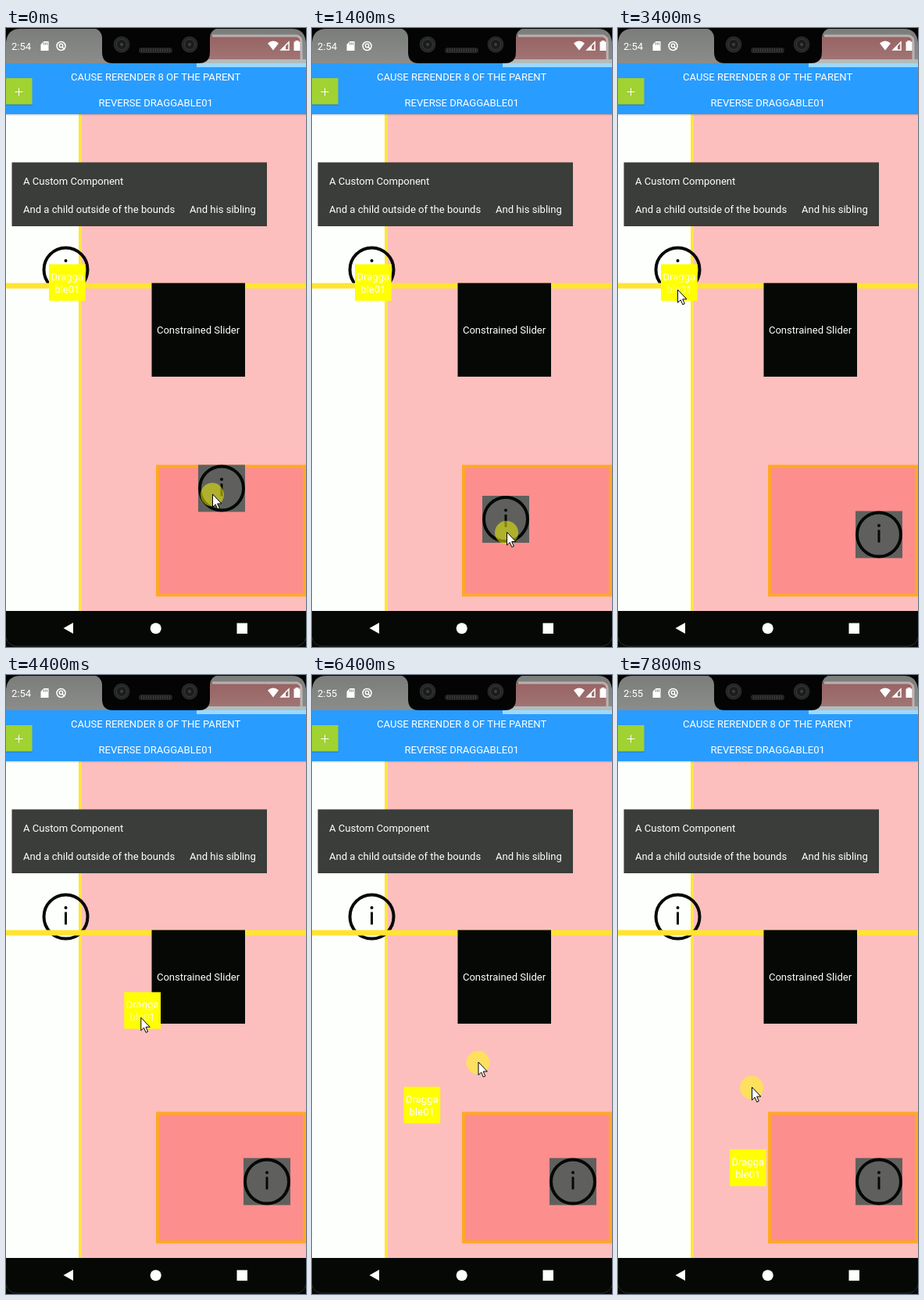
Recreate the animation shown at these times as an HTML page. Size 384x790 px, loop 8 s.

```html
<!DOCTYPE html>
<html lang="en">
<head>
<meta charset="utf-8">
<style>
  html, body { margin: 0; width: 100%; height: 100%; overflow: hidden; background: #050805; }
  svg { display: block; width: 100vw; height: 100vh; }
  text { font: 13.07px Roboto, sans-serif; fill: #fff; }
  .mid { text-anchor: middle; }
</style>
</head>
<body>
<svg viewBox="0 0 384 790">
  <defs>
    <linearGradient id="bar" x2="0" y2="1">
      <stop stop-color="#7b7d7b"/><stop offset="1" stop-color="#8b8d8b"/>
    </linearGradient>
    <linearGradient id="glare" x2="0" y2="1">
      <stop stop-color="#976262"/><stop offset="1" stop-color="#a27777"/>
    </linearGradient>
    <g id="info" fill="#050805">
      <circle cx="30" cy="30" r="28" fill="none" stroke="#050805" stroke-width="4"/>
      <circle cx="30" cy="18.5" r="2"/>
      <path d="M28.5 24h3v16h-3z"/>
    </g>
    <g id="camera">
      <circle r="10.5" fill="#262827"/>
      <circle r="6.5" fill="#1b1d1c" stroke="#393b3a"/>
      <circle r="2" fill="#3d403f"/>
    </g>
  </defs>

  <!-- page -->
  <path fill="#fdfffc" d="M0 110h96v634H0z"/>
  <path fill="#fdbebe" d="M96 110h288v634H96z"/>
  <path fill="#ffe63a" d="M93 110h4v634h-4z"/>
  <use href="#info" x="46.500" y="278.500"/>
  <path fill="#ffe432" d="M0 325.500h384v7H0z"/>
  <path fill="#050805" d="M186.500 325.500H306V445H186.500z"/>
  <text class="mid" x="246" y="390">Constrained Slider</text>
  <path fill="#fd8e8e" stroke="#ffa826" stroke-width="4" d="M194 559.500h188v164H194z"/>
  <path fill="#3a3d39" d="M7.500 171.500H334V253H7.500z"/>
  <text x="22" y="200">A Custom Component</text>
  <text x="22" y="236">And a child outside of the bounds</text>
  <text x="235" y="236">And his sibling</text>

  <!-- header -->
  <path fill="#000" opacity=".15" d="M0 110h384v1.500H0z"/>
  <path fill="#299cff" d="M0 45h384v65H0z"/>
  <path fill="#9cd9ff" d="M244 45h140v5H244z"/>
  <text class="mid" x="191.700" y="67">CAUSE RERENDER 8 OF THE PARENT</text>
  <text class="mid" x="191.700" y="99.500">REVERSE DRAGGABLE01</text>
  <path fill="#000" opacity=".15" d="M0 97h34v2H0z"/>
  <path fill="#a0d232" d="M0 64h33.500v33.500H0z"/>
  <path stroke="#fff" d="M11.500 81.500h10M16.500 76.500v10"/>

  <!-- status bar and notch -->
  <path fill="#030403" d="M0 0h384v45H0z"/>
  <path fill="url(#bar)" d="M0 45V18Q2 1 18 1H366Q382 1 384 18V45z"/>
  <path fill="url(#glare)" d="M262 9H378V45H248z"/>
  <path fill="none" stroke="#c4c8c8" stroke-width="3" opacity=".75" d="M264 10h108q6 1 6 8v27"/>
  <path fill="#b4bcbc" d="M248 40h136v5H244z"/>
  <path fill="#030403" d="M112 0q10 2 11 12v19q0 14 14 14h110q14 0 14-14V12q1-10 11-12z"/>
  <use href="#camera" x="148" y="21"/>
  <use href="#camera" x="235" y="21"/>
  <rect x="170" y="25" width="43" height="7" rx="3.500" fill="#222423"/>
  <path stroke="#3d3f3e" stroke-width="4" stroke-dasharray="1 2" d="M173 28.500h38"/>
  <text id="clock" x="7" y="27.700"></text>
  <path fill="#fff" d="M48.500 17h6v12h-10v-8z"/>
  <path stroke="#838583" stroke-width="3" stroke-dasharray="1 1" d="M48 20h5"/>
  <g fill="none" stroke="#fff" stroke-width="1.500">
    <circle cx="70.500" cy="23" r="5.500"/>
    <circle cx="70.500" cy="22.500" r="2.200"/>
    <path d="M72 24l3 3.500M352 28l10-10v10z"/>
  </g>
  <path fill="#fff" d="M335 19.500q7-6 14 0l-7 9zM352 28l6-6v6zM368.500 17.500h2V16h4v1.500h2V29h-8z"/>

  <!-- navigation bar -->
  <path fill="#050805" d="M0 744h384v46H0z"/>
  <path fill="none" stroke="#2b2d2b" d="M0 778q2 10 13 11h358q11-1 13-11"/>
  <path fill="#fff" d="M73.500 766l12.500-7v14zM295.500 759.500H309V773h-13.500z"/>
  <circle cx="191.700" cy="766.300" r="7" fill="#fff"/>

  <!-- moving parts -->
  <g id="icon">
    <path fill="#5f605d" d="M0 0h60v60H0z"/>
    <use href="#info"/>
  </g>
  <g id="draggable">
    <path fill="#ff0" d="M0 0h46.700v46.700H0z"/>
    <text class="mid" x="23.300" y="20.700">Dragga</text>
    <text class="mid" x="23.300" y="36">ble01</text>
  </g>
  <g id="pointer">
    <circle cy="1" r="15" fill="#ff0" fill-opacity=".5"/>
    <path fill="#fff" stroke="#000" d="M.5.500V17l3.700-3.500 2.600 6 2.500-1.100-2.600-5.900h5.200z"/>
  </g>
</svg>
<script>
  const LOOP = 8000, STEP = 200;
  const byId = id => document.getElementById(id);
  const add = (a, b) => [a[0] + b[0], a[1] + b[1]];
  const scale = (a, k) => [a[0] * k, a[1] * k];

  function poseAt(time) {
    const progress = (start, end) => Math.min(1, Math.max(0, (time - start) / (end - start)));
    const move = (from, to, start, end) => {
      const p = progress(start, end), eased = p * p * (3 - 2 * p);
      return add(scale(from, 1 - eased), scale(to, eased));
    };
    // An excursion that leaves a point and returns to it.
    const swing = (offset, start, end) => scale(offset, Math.sin(Math.PI * progress(start, end)));

    let icon = move([246, 557.5], [218, 597], 0, 1400);
    icon = move(icon, [227, 616.5], 1400, 2200);
    icon = move(icon, [304, 616.5], 2200, 2600);

    let draggable = move([55, 301.5], [159, 413], 3400, 4600);
    draggable = move(draggable, [117.5, 525.5], 5400, 6200);
    draggable = move(draggable, [143, 605.5], 6600, 7000);

    // The pointer holds the icon first, then the draggable, with free swings between drags.
    let grip = move([18, 37], [31, 46], 0, 1400);
    grip = move(grip, [53, 14], 1400, 2200);
    let pointer = move(add(icon, grip), add(draggable, [21, 32]), 2600, 3200);
    pointer = add(pointer, swing([-70, 38], 5000, 5400));
    pointer = add(pointer, swing([74, -64], 6200, 6600));
    pointer = add(pointer, swing([7, -112], 7000, 8600));

    return { icon, draggable, pointer };
  }

  function draw(now) {
    const time = Math.floor(now % LOOP / STEP) * STEP;
    for (const [id, position] of Object.entries(poseAt(time)))
      byId(id).setAttribute('transform', `translate(${position})`);
    byId('clock').textContent = time < 5000 ? '2:54' : '2:55';
    requestAnimationFrame(draw);
  }
  draw(0);
</script>
</body>
</html>
```
